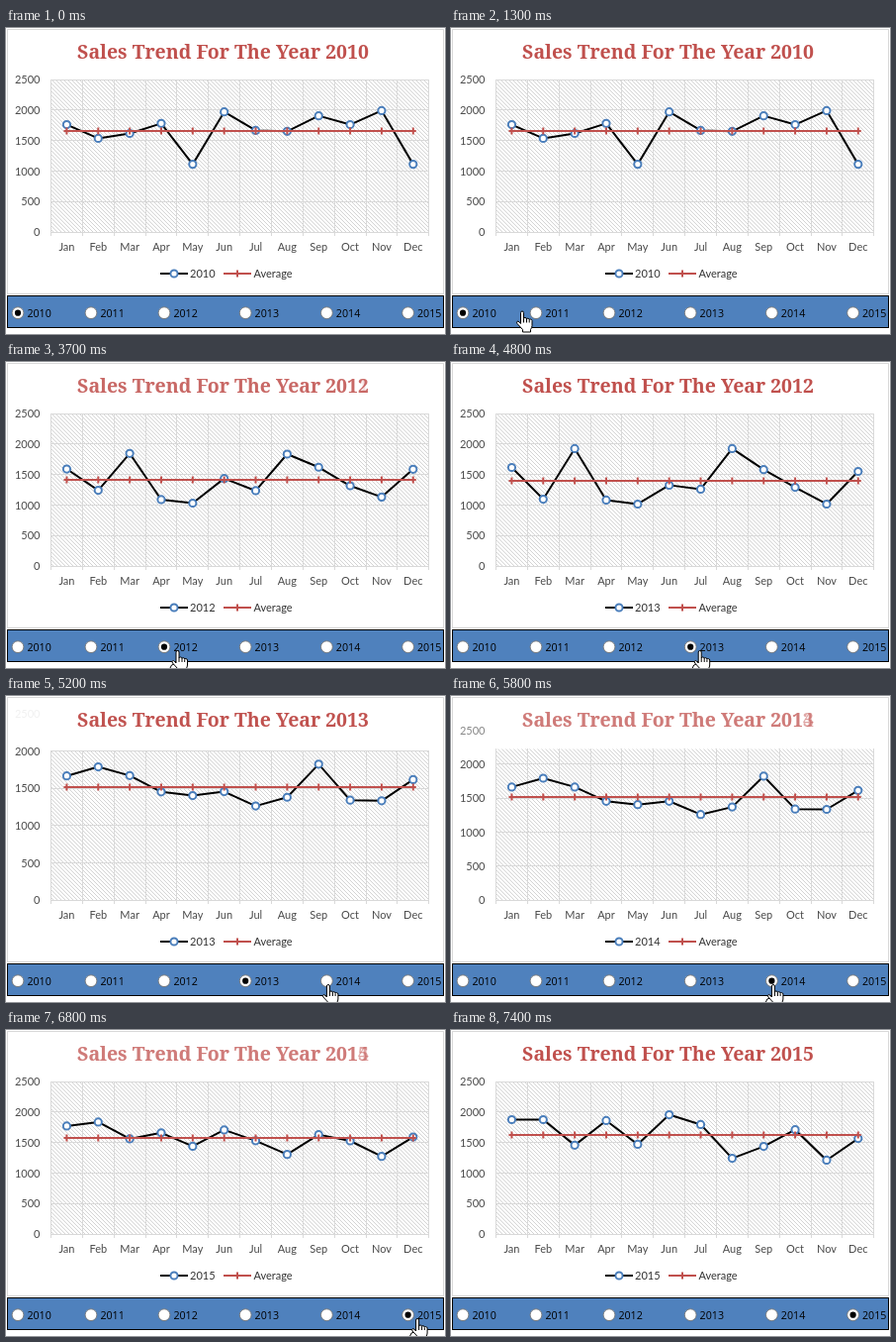
An HTML page for the animation above (8400 ms loop, 444x309 px).

```html
<!DOCTYPE html>
<html lang="en">
<head>
<meta charset="utf-8">
<title>Sales trend</title>
<style>
html, body { margin: 0; width: 100%; height: 100%; overflow: hidden; background: #fff; }
svg { display: block; }
.label { font: 11px Lato, sans-serif; fill: #4a4a4a; }
.dark { fill: #333; }
.title { font: bold 19.5px "Noto Serif", serif; fill: #c0504d; }
.option { font: 10.7px "Open Sans", sans-serif; fill: #000; }
.mid { text-anchor: middle; }
.end { text-anchor: end; }
.grid { stroke: #d9d9d9; shape-rendering: crispEdges; }
.sales { fill: none; stroke: #000; stroke-width: 2; stroke-linejoin: round; }
.average { fill: none; stroke: #c0504d; stroke-width: 2; }
.dot { fill: #fff; stroke: #4a7ebb; stroke-width: 2; }
</style>
</head>
<body>
<svg id="stage" width="444" height="309" viewBox="0 0 444 309"></svg>
<script>
const LOOP = 8400, STEP = 100, FADE = 340;
const LEFT = 45.5, BASE = 206, COL = 31.85, UNIT = 30.8, WIDE_UNIT = 37.75;
const MONTHS = 'Jan Feb Mar Apr May Jun Jul Aug Sep Oct Nov Dec'.split(' ');

const SALES = {
  2010: [1760, 1535, 1615, 1780, 1110, 1970, 1665, 1650, 1905, 1760, 1990, 1110],
  2011: [1470, 1955, 1455, 1130, 1110, 1970, 1110, 1390, 1810, 1435, 1695, 1760],
  2012: [1615, 1095, 1925, 1080, 1015, 1325, 1260, 1925, 1580, 1290, 1015, 1550],
  2013: [1665, 1795, 1665, 1455, 1405, 1455, 1260, 1370, 1825, 1340, 1335, 1615],
  2015: [1875, 1875, 1455, 1860, 1470, 1955, 1795, 1240, 1435, 1710, 1210, 1565]
};
SALES[2014] = SALES[2013];

// aim: where the hand rests beside the option; lag: chart delay after the pick
const YEARS = [
  { name: 2010 },
  { name: 2011, aim: -3, lag: -100 },
  { name: 2012, aim: 7 },
  { name: 2013, aim: 3, lag: 300, unit: WIDE_UNIT },
  { name: 2014, aim: -5 },
  { name: 2015, aim: 3 }
].map(({ name, aim, lag = 0, unit = UNIT }, i) => {
  const pick = i ? Math.ceil((1325 + 1075 * i) / STEP) * STEP : -LOOP;
  const x = 12 + 74 * i + 8.2 * Math.max(0, i - 2);
  return { name, unit, pick, x, morph: pick + lag, hand: x + aim, data: SALES[name] };
});

// The hand comes in, rests around each pick, and leaves
const STOPS = [
  { from: 700, to: 700, x: 48, y: 290 },
  ...YEARS.slice(1).map(y => ({ from: y.pick - 500, to: y.pick + 200, x: y.hand, y: 291 })),
  { from: 7400, to: 7400, x: 415, y: 312 }
];
const LIFT = 5;
const HAND = 'M5 13V2Q5 .5 6.5 .5T8 2V8Q8 7 9.5 7T11 8.5Q11 7.7 12.3 7.7T13.7 9.2' +
  'Q13.7 8.5 15 8.6T16.5 10V15Q16.5 17 15 19V21.5H7V19L1.5 13Q.5 11.5 1.5 10.8T3.5 11.5Z' +
  'M8 8V12M11 8.5V12M13.7 9.5V12';

const stage = document.getElementById('stage');
const lerp = (a, b, p) => a + (b - a) * p;
const colX = i => LEFT + COL * (i + 0.5);

function set(el, attrs) {
  for (const key in attrs) el.setAttribute(key, attrs[key]);
  return el;
}
function add(tag, attrs, parent = stage) {
  const el = document.createElementNS('http://www.w3.org/2000/svg', tag);
  return parent.appendChild(set(el, attrs));
}
function text(str, x, y, cls) {
  const el = add('text', { x, y, class: cls });
  el.textContent = str;
  return el;
}
const show = (el, on) => set(el, { visibility: on ? 'visible' : 'hidden' });
const plus = (x, y) => `M${x - 3} ${y}h6M${x} ${y - 3.5}v7`;
const addDot = (cx, cy) => add('circle', { cx, cy, r: 3.6, class: 'dot' });

// Chart frame and hatched plot
const hatch = add('pattern', { id: 'hatch', x: 2, width: 4, height: 4, patternUnits: 'userSpaceOnUse' }, add('defs', {}));
add('path', { d: 'M0 .5h1M1 1.5h1M2 2.5h1M3 3.5h1', stroke: '#d4d4d4', 'shape-rendering': 'crispEdges' }, hatch);
add('rect', { x: 1.5, y: 1.5, width: 441, height: 267, fill: '#fff', stroke: '#d9d9d9' });
const plot = add('rect', { x: LEFT, width: COL * 12, fill: 'url(#hatch)' });
const columns = add('path', { class: 'grid', fill: 'none' });
const rows = [], scale = [];
for (let i = 0; i < 6; i++) {
  rows.push(add('path', { class: 'grid' }));
  scale.push(text(i * 500, 34.5, 0, 'label end'));
}
MONTHS.forEach((m, i) => text(m, colX(i), 225, 'label mid'));

// Two titles for the cross-fade
const oldTitle = text('', 72, 31, 'title'), newTitle = text('', 72, 31, 'title');

// Series and legend
const sales = add('path', { class: 'sales' });
const dots = MONTHS.map((m, i) => addDot(colX(i), 0));
const average = add('path', { class: 'average' });
add('path', { d: 'M156 248H184', class: 'sales' });
addDot(170, 248);
const legend = text('', 186, 252, 'label dark');
add('path', { d: 'M220 248H248' + plus(234, 248), class: 'average' });
text('Average', 250.5, 252, 'label dark');

// Option bar
add('rect', { x: 1.5, y: 270.5, width: 441, height: 32, fill: '#4f81bd', stroke: '#000' });
const picks = YEARS.map(({ name, x }) => {
  add('circle', { cx: x, cy: 287.7, r: 5.9, fill: '#fff', stroke: '#777', 'stroke-width': 0.9 });
  text(name, x + 9.4, 291.6, 'option');
  return add('circle', { cx: x, cy: 287.7, r: 3.1 });
});

const trail = add('path', { d: 'M-1 18l1.5-3q3-2 5 0t1 3', fill: 'none', stroke: '#000' });
const hand = add('path', { d: HAND, fill: '#fff', stroke: '#000', 'stroke-linejoin': 'round' });

function setTitle(el, year, opacity) {
  el.textContent = 'Sales Trend For The Year ' + year;
  set(el, { opacity });
}

function drawChart(t) {
  const now = YEARS.filter(y => t >= y.morph).length - 1;
  const to = YEARS[now], from = YEARS[Math.max(0, now - 1)];
  const u = Math.min(1, (t - to.morph) / FADE), p = 1 - (1 - u) ** 2;
  const unit = lerp(from.unit, to.unit, p);

  // How far the axis is on its way to ending at 2000
  const wide = (unit - UNIT) / (WIDE_UNIT - UNIT);
  const top = lerp(BASE - 5 * UNIT, BASE - 4 * WIDE_UNIT, wide);
  set(plot, { y: top, height: BASE - top });
  let lines = '';
  for (let i = 0; i <= 12; i++) lines += `M${Math.floor(LEFT + COL * i) + 0.5} ${top}V${BASE + 4}`;
  set(columns, { d: lines });
  rows.forEach((row, i) => {
    const y = BASE - unit * i;
    set(row, { d: `M${LEFT} ${Math.floor(y) + 0.5}H${LEFT + COL * 12}` });
    set(scale[i], { y: y + 4.2 });
  });
  show(rows[5], wide < 0.01);
  set(scale[5], { opacity: Math.max(0, 1 - wide) ** 0.6 });

  const ys = to.data.map((v, i) => BASE - lerp(from.data[i], v, p) * unit / 500);
  const mean = Math.round(ys.reduce((a, b) => a + b) / ys.length);
  set(sales, { d: 'M' + ys.map((y, i) => `${colX(i)} ${y}`).join('L') });
  dots.forEach((dot, i) => set(dot, { cy: ys[i] }));
  set(average, { d: `M${colX(0)} ${mean}H${colX(11)}` + ys.map((y, i) => plus(colX(i), mean)).join('') });

  setTitle(oldTitle, from.name, 1 - p);
  setTitle(newTitle, to.name, p);
}

function drawHand(t, picked) {
  const next = STOPS.findIndex(s => s.from > t);
  show(hand, next > 0);
  show(trail, next > 0 && t <= picked.pick + 200);
  if (next < 1) return;
  const a = STOPS[next - 1], b = STOPS[next];
  const p = Math.max(0, (t - a.to) / (b.from - a.to));
  const y = lerp(a.y, b.y, p) - LIFT * Math.sin(Math.PI * p);
  const transform = `translate(${lerp(a.x, b.x, p)} ${y})`;
  set(hand, { transform });
  set(trail, { transform });
}

function draw(ms) {
  const t = Math.floor((ms % LOOP) / STEP) * STEP;
  const picked = YEARS.filter(y => t >= y.pick).pop();
  picks.forEach((dot, i) => show(dot, YEARS[i] === picked));
  legend.textContent = picked.name;
  drawChart(t);
  drawHand(t, picked);
}

const start = performance.now();
function tick() {
  draw(performance.now() - start);
  requestAnimationFrame(tick);
}
tick();
</script>
</body>
</html>
```
